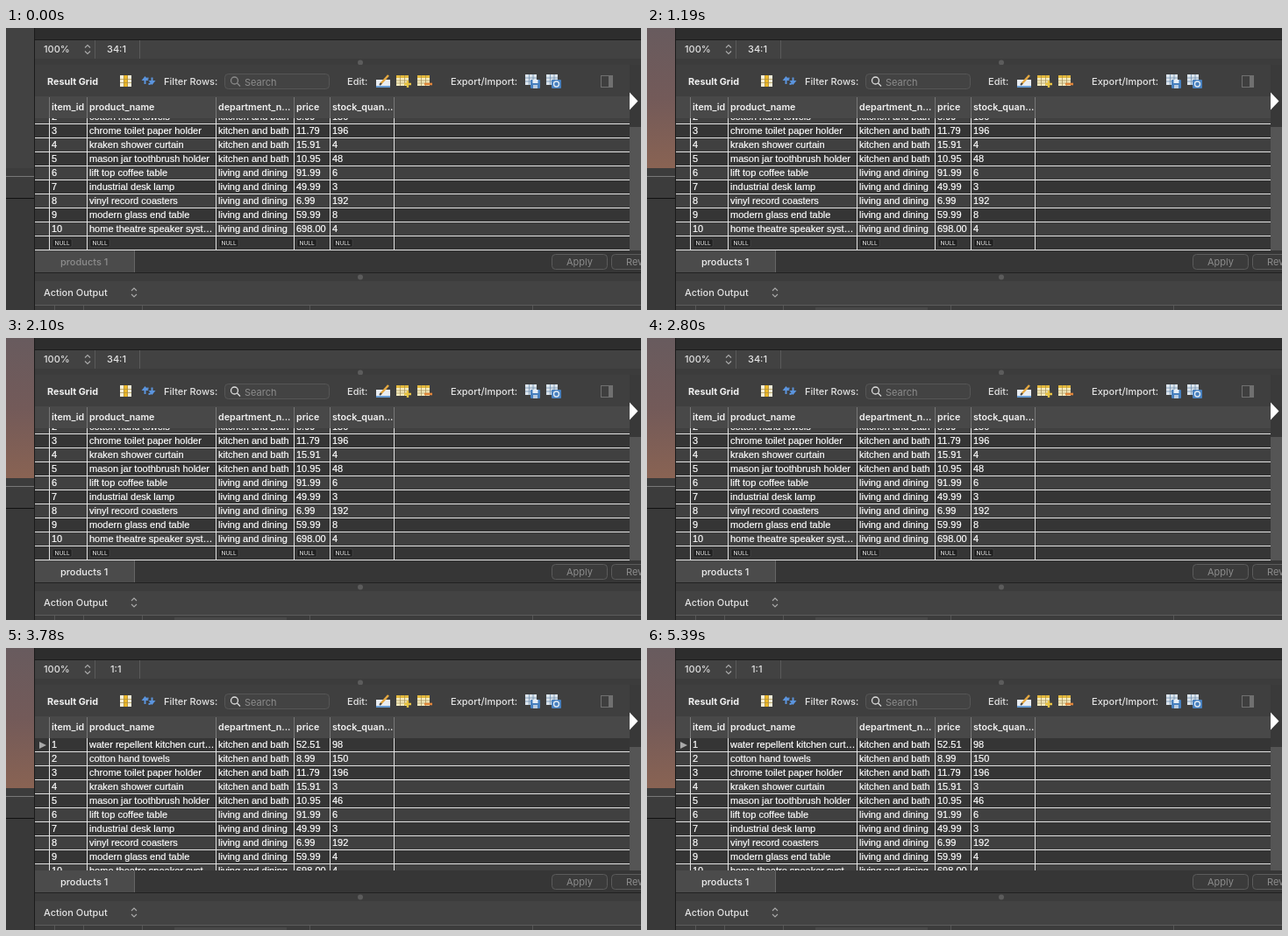
These frames come from a looping animation (724 by 322 pixels, 5.53 s). An HTML page:

```html
<!DOCTYPE html>
<html lang="en">
<head>
<meta charset="utf-8">
<title>Result grid</title>
<style>
html, body { margin: 0; width: 100%; height: 100%; overflow: hidden; background: #2b2b2b; }
svg { display: block; width: 724px; height: 322px; }
text { white-space: pre; }
.ui { font: 500 11px Inter, sans-serif; fill: #e4e4e4; }
.strong { font: 700 10.8px Inter, sans-serif; fill: #f0f0f0; }
.muted { font: 400 11px Inter, sans-serif; fill: #8c8c8c; }
.head { font: 600 10.7px Inter, sans-serif; fill: #f2f2f2; }
.cell { font: 11px "Liberation Sans", Arial, sans-serif; fill: #fff; stroke: #fff; stroke-width: .2; }
.null { font: 500 6.6px Inter, sans-serif; fill: #d0d0d0; }
</style>
</head>
<body>
<svg id="stage" viewBox="0 0 724 322" xmlns="http://www.w3.org/2000/svg"></svg>
<script>
const LOOP = 5530, FOCUS = 1190, REFRESH = 2940;
const columns = [50, 93, 240, 329, 370];
const edges = [49, 92, 239, 328, 369, 442];
const kitchen = 'kitchen and bath', living = 'living and dining';
// name, department, price, stock before, stock after
const products = [
  ['water repellent kitchen curt…', kitchen, '52.51', 98, 98],
  ['cotton hand towels', kitchen, '8.99', 150, 150],
  ['chrome toilet paper holder', kitchen, '11.79', 196, 196],
  ['kraken shower curtain', kitchen, '15.91', 4, 3],
  ['mason jar toothbrush holder', kitchen, '10.95', 48, 46],
  ['lift top coffee table', living, '91.99', 6, 6],
  ['industrial desk lamp', living, '49.99', 3, 3],
  ['vinyl record coasters', living, '6.99', 192, 192],
  ['modern glass end table', living, '59.99', 8, 4],
  ['home theatre speaker syst…', living, '698.00', 4, 4]
];

const rect = (x, y, w, h, fill, more = '') =>
  `<rect x="${x}" y="${y}" width="${w}" height="${h}" fill="${fill}" ${more}/>`;
const text = (x, y, s, cls = 'ui', more = '') =>
  `<text x="${x}" y="${y}" class="${cls}" ${more}>${s}</text>`;
const path = (d, stroke, width = 1, fill = 'none') =>
  `<path d="${d}" stroke="${stroke}" stroke-width="${width}" fill="${fill}"/>`;
const dot = y => `<circle cx="404" cy="${y}" r="3" fill="#5c5c5c"/>`;
const arrows = (x, y) =>
  path(`M${x - 3} ${y - 2}l3 -3l3 3M${x - 3} ${y + 2}l3 3l3 -3`, '#aaa', 1.1);
const button = (x, label, labelX) =>
  rect(x, 258.5, 63, 17, '#3b3b3b', 'rx="4" stroke="#5b5b5b"') + text(labelX, 271, label, 'muted');

function rows(top, refreshed) {
  let out = '';
  for (let i = 0; i <= products.length; i++) {
    const y = top + i * 16;
    out += rect(33, y, 678, 16, i % 2 ? '#404040' : '#353535');
    out += rect(33, y + 15, 678, 1, '#e2e2e2');
    const p = products[i];
    if (p) {
      const cells = [i + 1, p[0], p[1], p[2], p[refreshed ? 4 : 3]];
      cells.forEach((s, c) => out += text(columns[c] + 2, y + 10.6, s, 'cell'));
    } else {
      columns.forEach(x => out +=
        rect(x + 3, y + 3, 22, 9, '#202020', 'rx="1.5" stroke="#505050" stroke-width=".6"') +
        text(x + 5.5, y + 10, 'NULL', 'null'));
    }
  }
  if (refreshed) out += path(`M38 ${top + 4}l8 4l-8 4z`, 'none', 0, '#a9a9a9');
  return out;
}

function sheetIcon(x, mark) {
  return `<g transform="translate(${x} 54)">` + rect(0, 0, 14, 12, '#f6ecc0') + rect(0, 0, 14, 3, '#e3b93c') +
    path('M0 6h14M0 9h14M4.5 0v12M9.5 0v12', '#a08a52', .7) + mark + '</g>';
}

function diskIcon(x, badge) {
  return `<g transform="translate(${x} 53)">` + rect(0, 0, 13, 12, '#dbe4ec') +
    path('M0 4h13M0 8h13M4.5 0v12M9 0v12', '#6e8fae', .8) +
    rect(6, 6, 11, 10, '#477fbd', 'rx="1"') + badge + '</g>';
}

function toolbar() {
  let out = rect(33, 42, 678, 36, '#3f3f3f') + rect(711, 42, 13, 36, '#3a3a3a');
  out += text(47, 65, 'Result Grid', 'strong');
  out += rect(130, 54, 13, 13, '#f4efd9') + rect(134, 54, 5, 13, '#eeb928') +
    path('M130 58.5h13M130 62.5h13M134.5 54v13M138.5 54v13', '#a58b45', .7);
  out += path('M158.5 64v-3.5q0 -3 4 -3M166.5 56.5v3.5q0 4 -4 4', '#5b94dd', 2) +
    path('M154.5 60h8l-4 -5zM162.5 60h8l-4 5z', 'none', 0, '#5b94dd');
  out += text(180, 65, 'Filter Rows:');
  out += rect(249.5, 52.5, 119, 17, '#434343', 'rx="4" stroke="#565656"');
  out += '<g id="glass" fill="none" stroke-width="1.3"><circle cx="260.5" cy="60" r="4"/><path d="M263.5 63l3.5 3.5"/></g>';
  out += text(272, 65.5, 'Search', 'muted');
  out += text(389, 65, 'Edit:');
  out += rect(422, 59, 16, 9, '#e9edf2') + rect(422, 66, 16, 2, '#679bd2') +
    path('M427 64l9 -10', '#e5a840', 2.5) + path('M426 65l2 -2', '#444', 2);
  out += sheetIcon(445, path('M9 10h8M13 6v8', '#e8c341', 2.4));
  out += sheetIcon(469, path('M8 10h9', '#e0853a', 2.6));
  out += text(507, 65, 'Export/Import:');
  out += diskIcon(592, rect(8.5, 6, 6, 4, '#e6eef5') + rect(9, 12, 5, 4, '#b8cbe0'));
  out += diskIcon(616, '<circle cx="11.5" cy="11" r="3" fill="none" stroke="#dce8f4" stroke-width="1.4"/>');
  out += rect(678.5, 54.5, 13, 13, 'none', 'stroke="#707070"') + rect(687, 55, 4, 12, '#707070');
  return out;
}

function scene() {
  let out = `<defs><linearGradient id="dusk" x2="0" y2="1">
    <stop stop-color="#685b5e"/><stop offset=".5" stop-color="#735a59"/><stop offset="1" stop-color="#896353"/>
    </linearGradient><clipPath id="view"><rect x="33" y="103" width="678" height="151"/></clipPath></defs>`;
  // left edge
  out += rect(0, 0, 724, 322, '#2b2b2b');
  out += rect(0, 0, 32, 160, '#424242') + `<g id="photo">${rect(0, 0, 32, 160, 'url(#dusk)')}</g>`;
  out += rect(0, 160, 32, 34, '#3c3c3c') + rect(0, 169, 32, 1, '#777') +
    rect(0, 194, 32, 1, '#111') + rect(0, 195, 32, 127, '#393939') +
    rect(32, 0, 1, 322, '#1b1b1b');
  // top strips
  out += rect(33, 0, 691, 13, '#2d2d2d') + rect(33, 13, 691, 1, '#1c1c1c') +
    rect(33, 14, 691, 21, '#424242') + rect(33, 35, 691, 7, '#3c3c3c');
  out += rect(101, 14, 1, 21, '#5a5a5a') + rect(152, 14, 1, 21, '#5a5a5a');
  out += text(43, 28, '100%') + arrows(93, 24.5) + text(115, 28, '34:1', 'ui', 'id="cursor"') + dot(39.5);
  out += toolbar();
  // grid
  out += rect(33, 78, 691, 176, '#383838') + rect(33, 78, 678, 25, '#484848');
  ['item_id', 'product_name', 'department_n...', 'price', 'stock_quan...'].forEach((s, i) =>
    out += text(columns[i] + 2, 94, s, 'head'));
  edges.forEach(x => out += rect(x, 79, 1, 24, '#777'));
  out += `<g clip-path="url(#view)"><g id="before">${rows(78, false)}</g><g id="after">${rows(103, true)}</g>`;
  edges.forEach(x => out += rect(x, 103, 1, 151, '#e2e2e2'));
  out += '</g>';
  out += rect(711, 113, 13, 141, '#555') + path('M711 73.5v20l9.5 -10z', 'none', 0, '#fff');
  // tab strip
  out += rect(33, 254, 691, 26, '#363636') + rect(33, 254, 113, 25, '#4b4b4b') +
    rect(146, 254, 1, 25, '#666') + rect(33, 279, 691, 1, '#222');
  out += text(62, 270.5, 'products 1', 'ui', 'id="tab"');
  out += button(622.5, 'Apply', 639) + button(690.5, 'Revert', 707);
  // output pane
  out += rect(33, 280, 691, 9, '#3c3c3c') + dot(284.5) + rect(33, 289, 691, 27, '#434343') +
    rect(33, 316, 691, 1, '#5c5c5c') + rect(33, 317, 691, 5, '#3c3c3c');
  out += text(43, 306, 'Action Output') + arrows(146, 302);
  out += `<g id="glow">${rect(192, 319, 128, 3, '#484848')}</g>`;
  [55, 88, 155, 346, 600].forEach(x => out += rect(x, 317, 1, 5, '#565656'));
  return out;
}

const stage = document.getElementById('stage');
stage.innerHTML = scene();
const el = id => document.getElementById(id);
const show = (id, on) => el(id).setAttribute('visibility', on ? 'visible' : 'hidden');

function draw(t) {
  const focused = t >= FOCUS, refreshed = t >= REFRESH;
  show('photo', focused);
  show('glow', focused);
  show('before', !refreshed);
  show('after', refreshed);
  el('glass').setAttribute('stroke', focused ? '#dedede' : '#8a8a8a');
  el('tab').style.fill = focused ? '#f0f0f0' : '#8d8d8d';
  el('cursor').textContent = refreshed ? '1:1' : '34:1';
  el('cursor').setAttribute('x', refreshed ? 119 : 115);
}

const start = performance.now();
function tick() {
  draw((performance.now() - start) % LOOP);
  requestAnimationFrame(tick);
}
tick();
</script>
</body>
</html>
```
